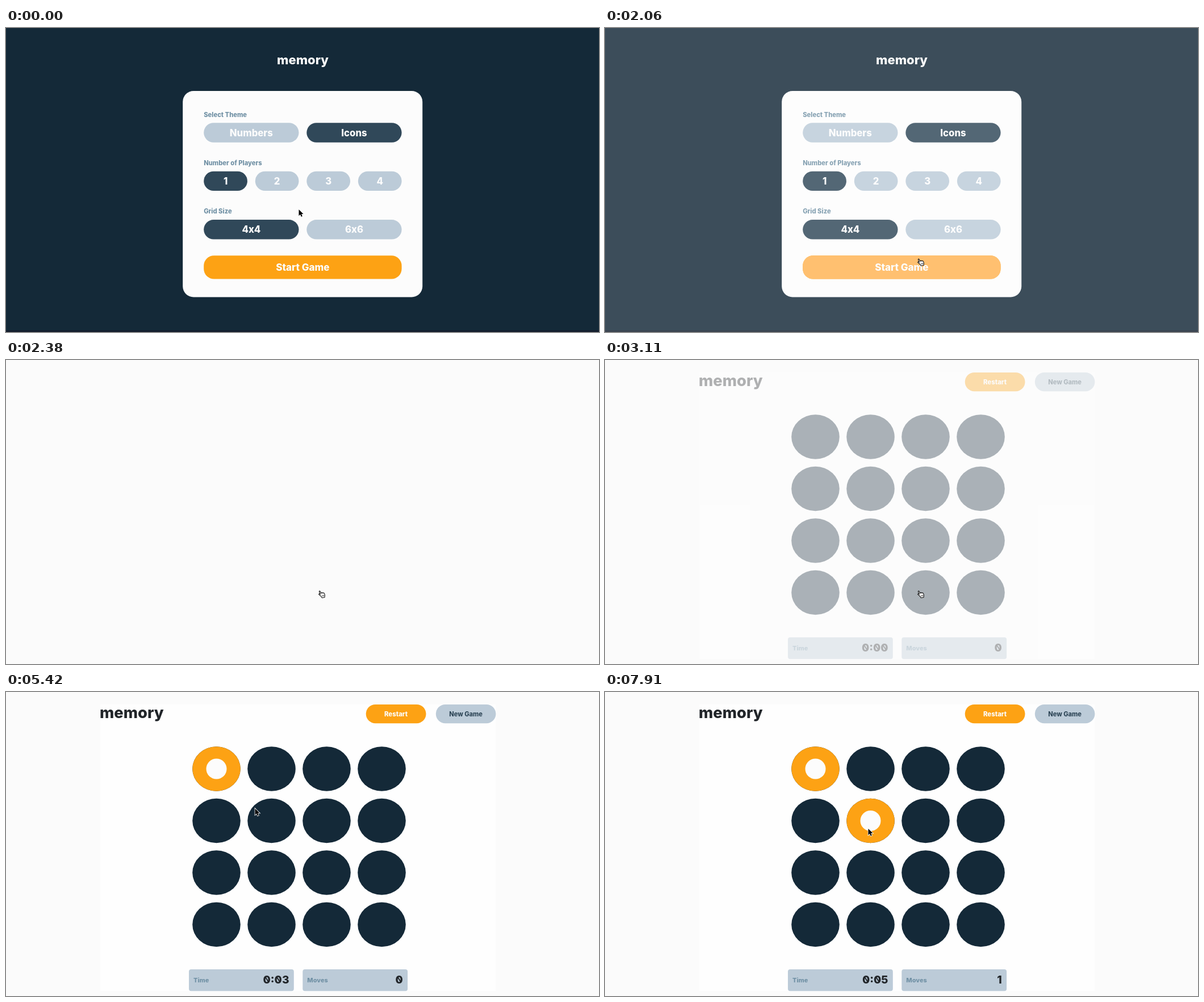
These frames come from a looping animation (1044x536 px, 8 s). An HTML page:

```html
<!DOCTYPE html>
<html lang="en">
<head>
<meta charset="utf-8">
<title>memory</title>
<style>
  html, body { margin: 0; width: 100%; height: 100%; overflow: hidden; background: #fbfbfb; }
  svg { display: block; width: 1044px; height: 536px; }
  text { font-family: Inter, "Noto Sans", sans-serif; font-weight: 800; }
</style>
</head>
<body>
<svg id="stage" viewBox="0 0 1044 536"></svg>
<script>
const LOOP = 8000, STEP = 88.5, PHASE = 14;
const NAVY = '#142938', SLATE = '#304859', MIST = '#bccbd8', AMBER = '#fda214',
      LABEL = '#7191a5', INK = '#212529', PAPER = '#fcfcfc', BACK = '#fbfbfb';

const stage = document.getElementById('stage');

function el(parent, tag, attrs = {}) {
  const node = document.createElementNS('http://www.w3.org/2000/svg', tag);
  for (const key in attrs) node.setAttribute(key, attrs[key]);
  parent.appendChild(node);
  return node;
}
const box = (parent, x, y, width, height, fill, rx = 0) =>
  el(parent, 'rect', { x, y, width, height, fill, rx });

function label(parent, str, x, y, size, fill, anchor = 'start') {
  const node = el(parent, 'text', { x, y, 'font-size': size, fill, 'text-anchor': anchor });
  node.textContent = str;
  return node;
}

// Returns the hover layer, which lies between the button and its text.
function button(parent, str, x, y, w, h, fill, size, { ink = PAPER, glow = '#94a8cb', r = h / 2 } = {}) {
  box(parent, x, y, w, h, fill, r);
  const hover = box(parent, x, y, w, h, glow, r);
  hover.setAttribute('opacity', 0);
  label(parent, str, x + w / 2, y + h / 2 + size * 0.365, size, ink, 'middle');
  return hover;
}

// Settings screen
const menu = el(stage, 'g');
const LEFT = 348.2, WIDTH = 348.4, GAP = 13.8;

function options(row, title, names, active) {
  const y = 167.3 + row * 85.4, w = (WIDTH + GAP) / names.length - GAP;
  label(menu, title, LEFT, y - 10.7, 11.2, LABEL);
  return names.map((name, i) => button(menu, name, LEFT + i * (w + GAP), y, w, 34.4,
    i === active ? SLATE : MIST, 16.7));
}

box(menu, 0, 0, 1044, 536, NAVY);
box(menu, 0, 533, 1044, 3, '#151f2e');
label(menu, 'memory', 522.5, 64, 22, PAPER, 'middle');
box(menu, 311.2, 111, 422, 363.5, PAPER, 19);
options(0, 'Select Theme', ['Numbers', 'Icons'], 1);
const players = options(1, 'Number of Players', [1, 2, 3, 4], 0);
const sizes = options(2, 'Grid Size', ['4x4', '6x6'], 0);
const start = button(menu, 'Start Game', LEFT, 401.2, WIDTH, 41.4, AMBER, 17, { glow: '#ffb353', r: 18 });

const veil = box(stage, 0, 0, 1044, 536, BACK);

// Game screen
const board = el(stage, 'g');
box(board, 165.5, 22, 697, 505.5, '#fefefe');
label(board, 'memory', 165, 46, 27.3, INK);
button(board, 'Restart', 633.7, 22, 105.8, 33.2, AMBER, 11.4);
button(board, 'New Game', 756.8, 22, 105.6, 33.2, MIST, 11.1, { ink: SLATE });

const disc = (parent, col, row, fill) => el(parent, 'ellipse',
  { cx: 370.5 + col * 97, cy: 135.5 + row * 91.5, rx: 42.3, ry: 39.2, fill });
for (let i = 0; i < 16; i++) disc(board, i % 4, i >> 2, NAVY);

function face(col, row) {
  const g = el(board, 'g'), back = disc(g, col, row, AMBER);
  el(g, 'circle', { cx: back.getAttribute('cx'), cy: back.getAttribute('cy'), r: 18, fill: PAPER });
  return g;
}
const firstFace = face(0, 0), secondFace = face(1, 1);

// Counter whose zeros carry a slash
function counter(name, x) {
  box(board, x, 489, 184.8, 38.2, MIST, 4);
  label(board, name, x + 8, 512, 11, LABEL);
  const text = label(board, '', x + 176.5, 513.6, 19.2, INK, 'end');
  const slash = el(board, 'path', { stroke: INK, 'stroke-width': 2 });
  return value => {
    if (text.textContent === value) return;
    text.textContent = value;
    let d = '';
    [...value].forEach((ch, i) => {
      if (ch !== '0') return;
      const r = text.getExtentOfChar(i);
      d += `M${r.x + r.width / 2 - 2.4} 502.7l4.8 7.8`;
    });
    slash.setAttribute('d', d);
  };
}
const setTime = counter('Time', 322), setMoves = counter('Moves', 522.3);

// Pointers
const arrow = el(stage, 'path', {
  d: 'M0 0V11.2L2.6 8.8 4.3 12.8 6.3 12 4.6 8H8Z',
  fill: '#000', stroke: '#fff', 'stroke-width': 1.6, 'paint-order': 'stroke'
});
const hand = el(stage, 'g');
const tilt = el(hand, 'g', { transform: 'rotate(-10 6 7)', stroke: '#000' });
el(tilt, 'path', {
  d: 'M3 9L1 6.8C.2 5.6 1.6 4.8 2.4 5.8L3.4 6.8 2.3 2C2 .5 3.7 .2 4.1 1.6L5.1 5' +
     'C5.5 4 6.8 4.1 7 5.1 7.5 4.3 8.6 4.6 8.8 5.5 9.4 4.9 10.5 5.3 10.7 6.4L11 9' +
     'C11 10.5 10.2 11.5 10 13.3H5.2C5 11.5 3.8 10.3 3 9Z',
  fill: '#fff', 'stroke-linejoin': 'round'
});
el(tilt, 'path', { d: 'M6.2 8.6v2.5M7.8 8.6v2.5M9.3 8.6v2.5', 'stroke-width': 0.6 });

// Pointer moves: begin, end, x, y
const moves = [
  [110, 380, 492, 350], [380, 910, 528, 289], [910, 1076, 632, 273],
  [1080, 1780, 550, 406], [3570, 3760, 452, 168], [3910, 4260, 381, 130],
  [4700, 5410, 438.5, 205.5], [6130, 6560, 464, 230], [7850, 7890, 463.5, 241]
];

const ramp = (t, a, b) => Math.min(1, Math.max(0, (t - a) / (b - a)));
const pulse = (t, peak, rise, fall) => ramp(t, peak - rise, peak) - ramp(t, peak + 100, peak + 100 + fall);
const fade = (node, value) => node.setAttribute('opacity', value);

function movePointer(t) {
  let x = 515.5, y = 320;
  for (const [begin, end, toX, toY] of moves) {
    const k = ramp(t, begin, end);
    x += (toX - x) * k;
    y += (toY - y) * k;
  }
  const clickable = (t > 980 && t < 4600) || (t > 6700 && t < 7880);
  for (const node of [arrow, hand]) node.setAttribute('transform', `translate(${x} ${y})`);
  fade(hand, +clickable);
  fade(arrow, +!clickable);
}

function draw(t) {
  fade(players[2], pulse(t, 990, 60, 140));
  fade(players[3], pulse(t, 1180, 100, 140));
  fade(sizes[1], pulse(t, 1520, 120, 140));
  fade(start, ramp(t, 1650, 1780));
  fade(veil, ramp(t, 1997, 2312));
  fade(board, ramp(t, 2930, 3200));
  fade(firstFace, ramp(t, 4400, 4660));
  fade(secondFace, ramp(t, 5420, 5670));
  setTime('0:0' + Math.max(0, Math.floor((t - 2470) / 980)));
  setMoves(t > 5570 ? '1' : '0');
  movePointer(t);
}

// The screen is refreshed at a fixed, slow rate.
function loop() {
  const now = performance.now() % LOOP;
  draw(PHASE + STEP * Math.floor((now - PHASE) / STEP));
  requestAnimationFrame(loop);
}
loop();
</script>
</body>
</html>
```
